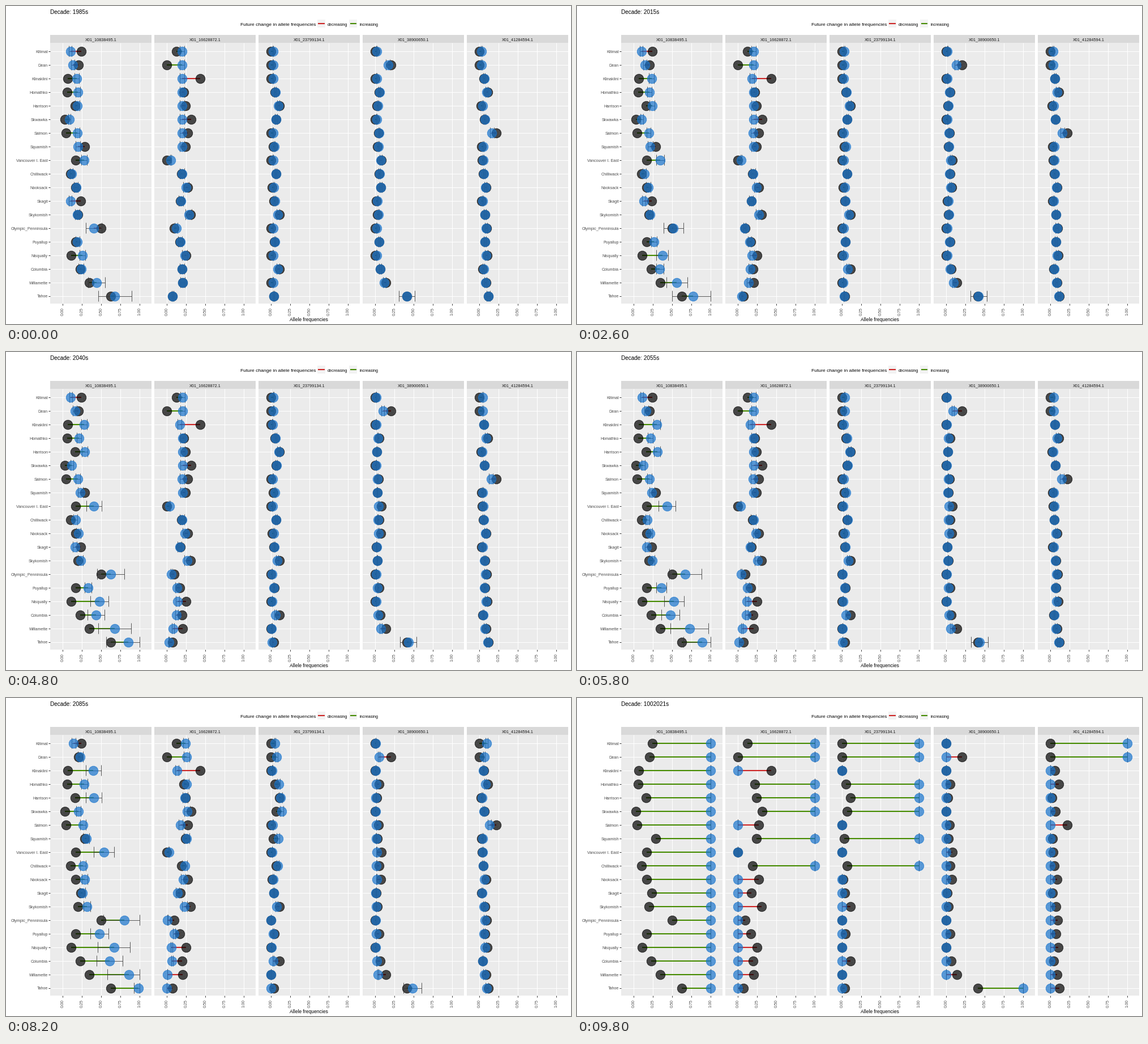
Write a matplotlib script that moves like this. It is 998x561 px and loops after 10000 ms.

```python
import numpy as np
import matplotlib.pyplot as plt
from matplotlib.animation import FuncAnimation
from matplotlib.collections import LineCollection
from matplotlib.patches import Rectangle

W, H = 998, 561
PX = 0.72                                   # points per pixel at 100 dpi
RED, GREEN = "#CD2626", "#458B00"
BLACK, BLUE = (0, 0, 0, 0.7), (24 / 255, 116 / 255, 205 / 255, 0.7)
TOP, BOTTOM = 65, 525
UNIT = 135.7                                # pixels for a frequency of 1
STEP = 184                                  # distance between panels

PLACES = ["Kitimat", "Dean", "Klinaklini", "Homathko", "Harrison", "Skwawka",
          "Salmon", "Squamish", "Vancouver I. East", "Chilliwack", "Nooksack",
          "Skagit", "Skykomish", "Olympic_Penninsula", "Puyallup", "Nisqually",
          "Columbia", "Willamette", "Tahoe"]
COUNT = len(PLACES)
ROWS = 79.5 + 24 * np.arange(COUNT)
LATE_YEARS = [2500, 3021, 7021, 12021, 102021, 1002021]
KEY_STEPS = [1, 36, 43, 44, 45, 46]

# Share of the way to fixation covered by 2070, from north to south
PACE = np.array([1, 5, 18, 3, 18, 5, 2, 6, 27, 9,
                 6, 10, 8, 56, 26, 45, 39, 64, 83]) / 100
# Logit growth until 2500 of the rows that rise
FAST = 12
NORTH = {0: 2.4, 1: 3.9, 3: 3.1, 4: 1.9, 5: 6.1, 7: 3.3, 9: 1.8}

plt.rcParams["font.family"] = "Liberation Sans"


def percent(*values):
    return np.array(values) / 100


def pulled(base, mean, pull):
    """First prediction: drawn towards the mean, except in the last row."""
    start = base + pull * (mean - base)
    start[-1] = base[-1]
    return start


def forecast(start, growth, rise, fade):
    """Frequencies at KEY_STEPS; rows in growth go to 1, the others to 0."""
    end, far = np.zeros(COUNT), np.zeros(COUNT)
    for row, g in growth.items():
        end[row] = 1
        far[row] = 1 / (1 + (1 / start[row] - 1) * np.exp(-g))
    share = np.clip(np.where(end > 0, rise, fade), 0, 1)
    mid = start + share * (end - start)
    near = np.clip(mid + 0.2 * (mid - start) + 0.1 * (far - mid), 0, 1)
    return np.array([start, mid, near, far, far + 0.88 * (end - far), end])


def spread(v):
    """Half width of the error bar for a predicted frequency."""
    return np.interp(v, [0, .1, .34, .4, .57, .75, .86, .95, 1],
                     [0, .018, .045, .1, .14, .265, .285, .18, 0])


names = ["X01_10838495.1", "X01_16628872.1", "X01_23799134.1",
         "X01_38900650.1", "X01_41284594.1"]

base1 = percent(24.5, 21, 6.3, 5.7, 16.2, 3.3, 4.5, 28.5, 16.6, 10.3,
                17.2, 23.5, 20, 50, 17.2, 10.7, 22.8, 35, 62.4)
start1 = percent(10, 13, 18.5, 20, 19, 9, 19, 20, 28, 11.5,
                 17.5, 10, 19, 40.5, 19.5, 26, 24, 44, 68)
base2 = percent(12.5, 0, 43.5, 22.2, 24.5, 32, 27, 24.6, 0, 19.5,
                27, 17.7, 31.3, 9.7, 16.7, 24.7, 20, 20.6, 7.7)
base3 = percent(0, 0, 0, 5, 11.4, 6.6, 0, 3.3, 0, 6.3,
                1.8, 3.8, 10.8, 0, 4.5, 0, 10.8, 0, 4)
base4 = percent(0, 21, 0, 5, 2.2, 0, 4.2, 3.3, 7.8, 5,
                7.3, 1.7, 3.3, 0, 4.8, 0, 6.5, 14.2, 41.2)
base5 = percent(0, 0, 5.6, 10.8, 2, 6.7, 22.2, 3.3, 3.8, 5,
                9, 2.8, 7.4, 9.7, 7.4, 10.3, 4.4, 8.6, 11.8)

pull2 = np.where(np.arange(COUNT) < 8, 1, 0.25)
all_fast = dict.fromkeys(range(COUNT), FAST)
paths = np.hstack([
    forecast(start1, all_fast | {0: 2.5, 1: 3.9}, PACE, 0),
    forecast(pulled(base2, 0.2, pull2), NORTH, 0.01, 1.4 * PACE),
    forecast(pulled(base3, 0.065, 0.4), NORTH, 0.01, 1.4 * PACE),
    forecast(pulled(base4, 0.07, 0.3), {18: FAST}, 0.05, 0.6),
    forecast(pulled(base5, 0.075, 0.4), {0: 4.2, 1: 2.1}, 0.02, 0.1),
])


def label(x, y, text, size, color="black", **kw):
    return ax.text(x, y, text, fontsize=size * PX, color=color, **kw)


def box(x, y, w, h, color):
    ax.add_patch(Rectangle((x, y), w, h, fc=color, ec="none", zorder=0))


def rule(xs, ys, color, width):
    ax.plot(xs, ys, color=color, lw=width * PX, solid_capstyle="butt",
            zorder=1)


def dots(x, color, z):
    return ax.scatter(x, all_y, s=(16.4 * PX) ** 2, facecolor=color,
                      edgecolor=color, linewidth=PX, antialiased=False,
                      zorder=z)


fig = plt.figure(figsize=(9.98, 5.61), dpi=100, facecolor="white")
ax = fig.add_axes([0, 0, 1, 1])
ax.set_xlim(0, W)
ax.set_ylim(H, 0)
ax.axis("off")

# Panels with strips, grids and ticks
for k, name in enumerate(names):
    left, zero = 78 + STEP * k, 100 + STEP * k
    box(left, 51, 179, 14, "#D9D9D9")
    box(left, TOP, 179, BOTTOM - TOP, "#EBEBEB")
    label(left + 89.5, 61.2, name, 7.3, "#1A1A1A", ha="center")
    for y in ROWS:
        rule([left, left + 179], [y, y], "white", 1.07)
    for i in range(5):
        x = zero + i * UNIT / 4
        rule([x, x], [TOP, BOTTOM], "white", 1.07)
        rule([x, x], [BOTTOM, BOTTOM + 2.5], "#333333", 1)
        label(x + 0.5, 538.5, f"{i / 4:.2f}", 7.3, "#4D4D4D",
              rotation=90, ha="center", va="center")
for y, place in zip(ROWS, PLACES):
    rule([75.5, 78], [y, y], "#333333", 1)
    label(74, y + 3, place, 7.2, "#4D4D4D", ha="right")

# Title, axis title and legend
title = label(78, 13.5, "", 10)
label(535.3, 555.7, "Allele frequencies", 8.55, ha="center")
label(414, 34.5, "Future change in allele frequencies", 8.5)
for x, color, text in [(550, RED, "decreasing"), (606.5, GREEN, "increasing")]:
    box(x, 24, 14, 14, "#F2F2F2")
    rule([x + 1.4, x + 12.6], [31, 31], color, 2.1)
    label(x + 17.7, 34.5, text, 7.25)

# Data layers
all_y = np.tile(ROWS, len(names))
zeros = np.repeat(100 + STEP * np.arange(len(names)), COUNT)
base = np.concatenate([base1, base2, base3, base4, base5])
base_x = zeros + UNIT * base

links = LineCollection([], linewidths=2.1 * PX, zorder=2)
bars = LineCollection([], linewidths=0.8 * PX, colors="#333333", zorder=4)
ax.add_collection(links, autolim=False)
ax.add_collection(bars, autolim=False)
dots(base_x, BLACK, 3)
blue = dots(base_x, BLUE, 5)


def lines(x0, y0, x1, y1):
    return np.stack([np.column_stack([x0, y0]), np.column_stack([x1, y1])], 1)


def year(step):
    if step >= 44:
        return LATE_YEARS[step - 44]
    return 1985 + 5 * ((max(step, 1) - 1) // 2)


def draw(step):
    value = np.array([np.interp(step, KEY_STEPS, v) for v in paths.T])
    half = spread(value)
    x = zeros + UNIT * value
    lo = zeros + UNIT * np.clip(value - half, 0, 1)
    hi = zeros + UNIT * np.clip(value + half, 0, 1)
    up, down = all_y - 9.6, all_y + 9.6
    links.set_segments(lines(base_x, all_y, x, all_y))
    links.set_color([RED if v < b else GREEN for v, b in zip(value, base)])
    bars.set_segments(np.concatenate([lines(lo, all_y, hi, all_y),
                                      lines(lo, up, lo, down),
                                      lines(hi, up, hi, down)]))
    blue.set_offsets(np.column_stack([x, all_y]))
    title.set_text(f"Decade: {year(step)}s")
    return links, bars, blue, title


anim = FuncAnimation(fig, draw, frames=50, interval=200, repeat=True,
                     repeat_delay=0, blit=False)
plt.show()
```
